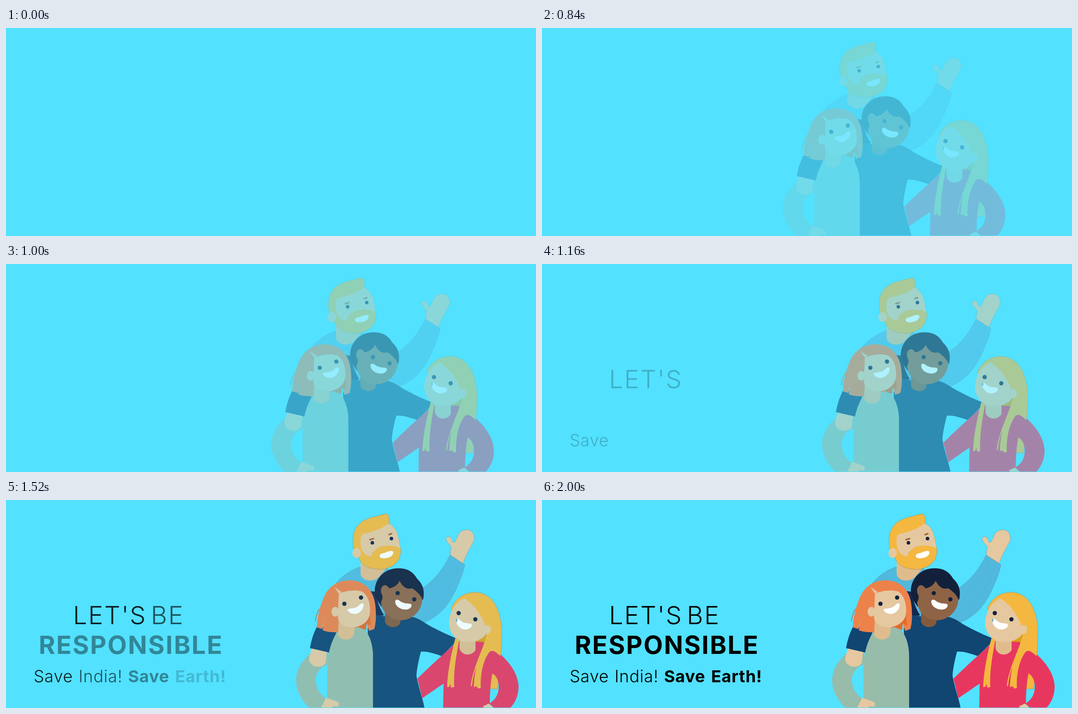
An HTML page for the animation above (4.04 s loop, 1194 by 469 pixels).

```html
<!DOCTYPE html>
<html lang="en">
<head>
<meta charset="utf-8">
<title>Let's be responsible</title>
<style>
  html, body { margin: 0; width: 100%; height: 100%; overflow: hidden; background: #52e1ff; }
  svg { display: block; width: 100%; height: 100%; }
  text { font-family: Inter, "Open Sans", sans-serif; text-anchor: middle; }
  .title { font-size: 56.5px; letter-spacing: 2.5px; }
  .sub { font-size: 37.5px; letter-spacing: .8px; }
  .light { font-weight: 300; }
  .bold { font-weight: 700; }
  .skin { fill: #e5c8a0; }
  .neck { fill: #e0bc8c; }
  .ink { fill: #13203c; }
  .gold { fill: #f4b840; }
  .orange { fill: #ed814a; }
  .navy { fill: #114572; }
  .sage { fill: #97bcaa; }
  .rose { fill: #e8375f; }
  .sky { fill: #51b8de; }
  .white { fill: #fff; }
  .line { fill: none; stroke-linecap: round; }
  .edge { stroke: #6d7f80; stroke-width: .5; }
</style>
</head>
<body>
<svg viewBox="0 0 1194 469">
  <clipPath id="floor"><rect width="1194" height="468"/></clipPath>
  <g clip-path="url(#floor)">
  <g id="people">
    <!-- bearded man -->
    <path class="sky edge" d="M800 150C770 160 748 178 733 203L740 260L900 280L945 275C975 262 995 240 1010 210C1022 185 1030 165 1034 146L1001 123C988 150 970 177 941 197L900 200L858 153Z"/>
    <path class="line" stroke="#48a9d0" opacity=".5" d="M1010 132Q995 180 950 222M1022 142Q1005 205 960 255"/>
    <path class="neck" d="M799 138V168C805 186 832 185 842 172L858 153L850 138Z"/>
    <path class="skin edge" d="M1001 124L1003 104C998 100 993 94 992 89C991 82 1000 80 1003 86C1006 91 1006 96 1010 96C1015 92 1017 80 1023 73C1032 65 1045 66 1050 72C1056 79 1057 88 1053 95C1045 110 1038 120 1030 143Z"/>
    <path class="gold edge" d="M784 112C778 82 784 60 805 47C820 38 840 36 855 31C862 31 864 37 863 53C876 60 882 72 884 84L889 108C893 135 875 152 850 156C825 158 806 150 799 138Z"/>
    <path class="skin" d="M803 77C820 73 845 67 862 53C876 60 882 72 884 84L889 109C875 101 850 101 838 108C830 113 825 118 823 127C810 127 800 115 799 100C798 90 799 82 803 77Z"/>
    <ellipse class="skin" cx="790" cy="119.500" rx="9.500" ry="11"/>
    <path class="line" stroke="#a5673a" stroke-width="3.500" d="M820 89.500L828 87M863 78L869 76"/>
    <circle class="ink" cx="825.500" cy="96.500" r="4"/><circle class="ink" cx="868.500" cy="87" r="4"/>
    <path class="white" d="M842 126C842 120 850 121 856 118C862 116 866 114 870 115C875 116 873 125 866 128C858 132 842 134 842 126Z"/>

    <!-- man in navy -->
    <path class="navy" d="M918 264C932 268 942 276 952 282C975 295 1000 306 1020 314L982 352C960 344 945 341 935 342C930 360 925 385 925 397C930 425 940 450 943 469H820L815 290L830 240L850 262Z"/>
    <path fill="#14284e" d="M818 205L834 207C835 225 842 245 852 260L828 260Z"/>
    <path fill="#835a3d" d="M854 250V275C860 290 882 290 888 278L890 266Z"/>
    <path class="ink" d="M887 154C855 152 831 176 831 205C831 217 838 230 846 240L937 226L940 224C944 205 940 190 926 177C918 163 905 154 887 154Z"/>
    <path fill="#8f6446" d="M845 233C846 225 850 224 848 215C842 205 845 192 855 192C862 194 862 200 866 199C876 196 884 190 887 182C893 196 905 203 915 199C925 205 935 215 938 224C937 250 915 272 889 271C865 270 850 255 845 233Z"/>
    <circle class="ink" cx="882.500" cy="210" r="4.800"/><circle class="ink" cx="920" cy="224" r="4.800"/>
    <path class="white" d="M877 229C877 223 884 224 888 228C896 234 906 233 911 234C917 236 914 245 903 247C890 248 877 240 877 229Z"/>

    <!-- woman in green, with an arm around her -->
    <path class="sage" d="M688 345C662 365 652 390 654 415C658 440 672 458 684 469H710L721 447C707 438 699 424 698 408C698 392 706 378 724 371L726 345Z"/>
    <path class="navy" d="M702 283L745 296L731 345L685 334C688 315 694 298 702 283Z"/>
    <path class="skin" d="M689 335L724 343C720 352 723 358 720 368C712 380 690 378 684 364C681 355 687 345 689 335Z"/>
    <path class="sage" d="M748 294C734 316 726 342 724 370V469H827V352C827 320 815 293 800 288Z"/>
    <path class="skin" d="M710 469L721 446L745 454C752 456 752 466 745 466C740 465 735 463 736 469Z"/>
    <path class="orange" d="M775 181C742 181 722 200 713 228C706 245 702 265 700 287L713 291L717 262L714 294C725 298 738 299 751 298L800 286L811 295L813 278L818 295L830 291C834 275 834 262 833 245C831 205 810 182 775 181Z"/>
    <path class="line" stroke="#b98260" stroke-width="2" d="M697 273Q699 258 706 246"/>
    <path fill="#e26a2a" d="M792 286C810 278 818 270 820 258L822 284L813 278L810 293Z"/>
    <path class="neck" d="M750 270L748 303C752 318 777 318 784 305L787 283Z"/>
    <path class="skin" d="M750 212C765 204 785 202 802 206C816 215 822 235 820 255C818 275 800 287 778 287C760 287 748 277 748 262Z"/>
    <path class="skin" d="M740 196L757 208L750 211Z"/>
    <ellipse class="skin" cx="742" cy="252" rx="8.500" ry="11"/>
    <circle class="ink" cx="762.500" cy="234" r="4.800"/><circle class="ink" cx="800" cy="220" r="4.800"/>
    <path class="white" d="M770 246C778 244 788 244 794 239C800 232 805 231 806 236C806 248 795 257 785 257C775 256 768 250 770 246Z"/>

    <!-- girl in pink -->
    <path class="gold edge" d="M1056 208C1025 209 1010 228 1003 245L1088 330V426H1108C1112 380 1118 330 1117 290C1114 245 1095 208 1056 208Z"/>
    <path fill="#dca019" d="M1055 318L1086 300L1080 328H1060Z"/>
    <path class="rose" d="M1018 318C1000 335 960 370 927 403L938 447C955 435 970 425 986 414L985 469H1090C1090 435 1092 410 1096 391C1104 396 1108 403 1110 415C1112 435 1104 450 1089 459L1100 469H1136C1145 460 1154 445 1155 422C1155 380 1112 340 1075 320Z"/>
    <path class="skin" d="M1075 465L1088 459L1098 469H1076Z"/>
    <path class="neck" d="M1022 308V335C1028 353 1050 352 1058 338V310Z"/>
    <path class="gold" d="M1013 310C1005 340 995 385 994 422L999 421L1001 414L1003 423L1010 422C1008 385 1015 350 1021 316Z"/>
    <path class="gold" d="M1084 300C1077 335 1052 375 1047 420L1050 419C1052 400 1056 385 1060 377C1056 392 1055 405 1054 422L1061 420L1063 425L1070 424C1068 395 1075 360 1090 342C1099 336 1108 347 1114 352L1117 290Z"/>
    <path class="skin" d="M1033 222C1015 228 1000 250 998 275C998 305 1020 320 1040 320C1060 321 1076 312 1082 302C1090 305 1094 295 1092 287C1090 282 1085 281 1080 284C1072 260 1055 235 1033 222Z"/>
    <circle class="ink" cx="1020" cy="255" r="4.800"/><circle class="ink" cx="1057.500" cy="269" r="4.800"/>
    <path class="white" d="M1015 269C1018 264 1023 272 1030 276C1038 279 1045 277 1049 280C1052 287 1043 292 1033 292C1022 290 1013 280 1015 269Z"/>
    <ellipse fill="#5aa9c4" cx="1015.500" cy="271" rx="1.500" ry="3.500"/>
  </g>
  </g>
  <g id="heading" class="title">
    <text class="light" x="234" y="279.500">LET'S</text>
    <text class="light" x="364" y="279.500">BE</text>
    <text class="bold" x="281.500" y="347">RESPONSIBLE</text>
  </g>
  <g id="tagline" class="sub">
    <text class="light" x="106.500" y="411">Save</text>
    <text class="light" x="213" y="411">India!</text>
    <text class="bold" x="321.500" y="411">Save</text>
    <text class="bold" x="438.500" y="411">Earth!</text>
  </g>
</svg>
<script>
const LOOP = 4040, STEP = 40;
const people = document.getElementById('people');
const lines = ['heading', 'tagline'].map(id => [...document.getElementById(id).children]);
const progress = (t, start, duration) => Math.min(1, Math.max(0, (t - start) / duration));

function draw(t) {
  // The group slides in on a cubic ease-out while fading linearly.
  const p = t < 720 ? 0 : progress(t, 620, 1000);
  people.setAttribute('opacity', p);
  people.setAttribute('transform', `translate(${-234 * (1 - p) ** 3} 0)`);
  // Both lines fade in word by word.
  for (const words of lines)
    words.forEach((word, i) => word.setAttribute('opacity', progress(t, 1035 + 130 * i, 560)));
}

const origin = performance.now();
function tick() {
  const t = (performance.now() - origin) % LOOP;
  draw(Math.floor(t / STEP) * STEP);
  requestAnimationFrame(tick);
}
tick();
</script>
</body>
</html>
```
